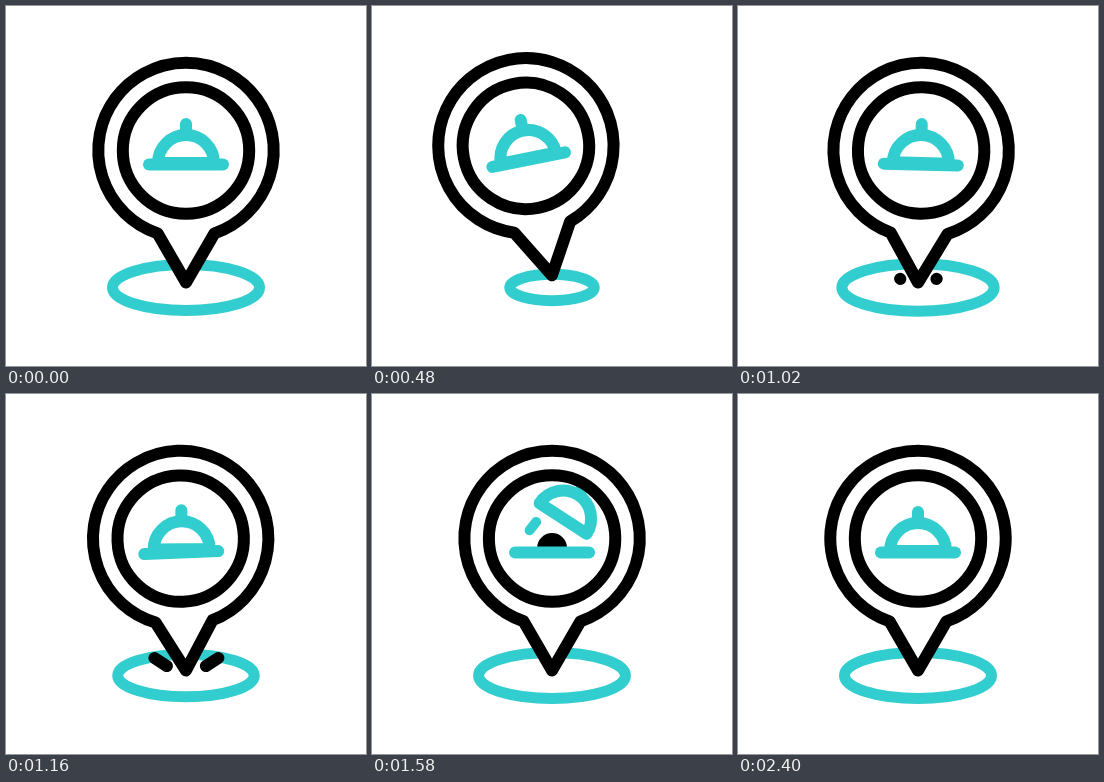
Recreate the animation shown at these times as an HTML page. Size 360 by 360 pixels, loop 3600 ms.

```html
<!DOCTYPE html>
<html>
<head>
<meta charset="utf-8">
<style>
  html, body { margin: 0; width: 100%; height: 100%; overflow: hidden; background: #fff; }
  svg { display: block; width: 100vw; height: 100vh; }
  svg * { stroke-linecap: round; stroke-linejoin: round; }
</style>
</head>
<body>
<svg viewBox="0 0 360 360" fill="none" stroke="#000" stroke-width="12">
  <ellipse id="ripple" cx="180" cy="281.5" stroke="#32cdce" stroke-width="11"/>
  <path id="splash"/>
  <g id="pin">
    <path d="M151.5 227.3A87.7 87.7 0 1 1 208.5 227.3L180 276.5Z" fill="#fff"/>
    <path id="food" d="M-15 0A15 15 0 0 1 15 0Z" fill="#000" stroke="none"/>
    <g stroke="#32cdce">
      <path id="dash" stroke-width="10"/>
      <g id="dome">
        <path d="M-28 0A28 28 0 0 1 28 0Z"/>
        <path d="M0 -39V-30"/>
      </g>
      <path d="M143 158.5H217"/>
    </g>
    <circle cx="180" cy="144.5" r="63.2"/>
  </g>
</svg>
<script>
const $ = id => document.getElementById(id);
const LOOP = 3600, TOP = 820, LAND = 1010, REST = 1610;

const smooth = u => u * u * (3 - 2 * u);
const cubic = u => u < .5 ? 4 * u ** 3 : 1 - 4 * (1 - u) ** 3;
const ramp = (t, a, b) => Math.min(1, Math.max(0, (t - a) / (b - a)));
const mix = (a, b, u) => a + (b - a) * u;

// Rises smoothly, holds until TOP, then drops faster and faster.
const leap = (t, start, end) => smooth(ramp(t, start, end)) * (1 - ramp(t, TOP, LAND) ** 2);

// Fading swing after the landing.
const wobble = (t, half) => t < LAND ? 0
  : Math.sin(Math.PI * (t - LAND) / half) * (1 - ramp(t, LAND, REST)) ** 1.5;

function draw(t) {
  const lean = leap(t, 20, TOP);
  const tilt = -18.5 * lean + 4.9 * wobble(t, 120);
  const spread = 1 - .694 * lean + .11 * wobble(t, 100);
  $('ripple').setAttribute('rx', 73.5 * spread);
  $('ripple').setAttribute('ry', 23 * spread);
  $('pin').setAttribute('transform',
    `translate(0 ${-22.5 * leap(t, 300, 780)}) rotate(${tilt} 180 277)`);

  // Two drops shoot out from the tip, then their tails catch up.
  const head = smooth(ramp(t, LAND, 1140)), tail = ramp(t, 1140, 1345);
  const drop = side => {
    const at = u => `${180.4 + side * mix(18, 32, u)} ${mix(273, 264, u)}`;
    return `M${at(tail)}L${at(head)}`;
  };
  $('splash').setAttribute('d', head > 0 && tail < 1 ? drop(-1) + drop(1) : '');

  const open = cubic(ramp(t, 1060, 1483)) - cubic(ramp(t, 1840, 2380));
  $('dome').setAttribute('transform',
    `translate(${180 + 11 * open} ${157 - 32.5 * open}) rotate(${33 * open})`);
  $('food').setAttribute('transform', `translate(180 154) scale(${Math.min(1, 1.4 * open)})`);
  $('dash').setAttribute('d', open > 0
    ? `M${152 + 5.5 * open} ${158 - 21.7 * open}L${152 + 12 * open} ${158 - 30 * open}` : '');
}

function frame() {
  draw(performance.now() % LOOP);
  requestAnimationFrame(frame);
}
frame();
</script>
</body>
</html>
```
